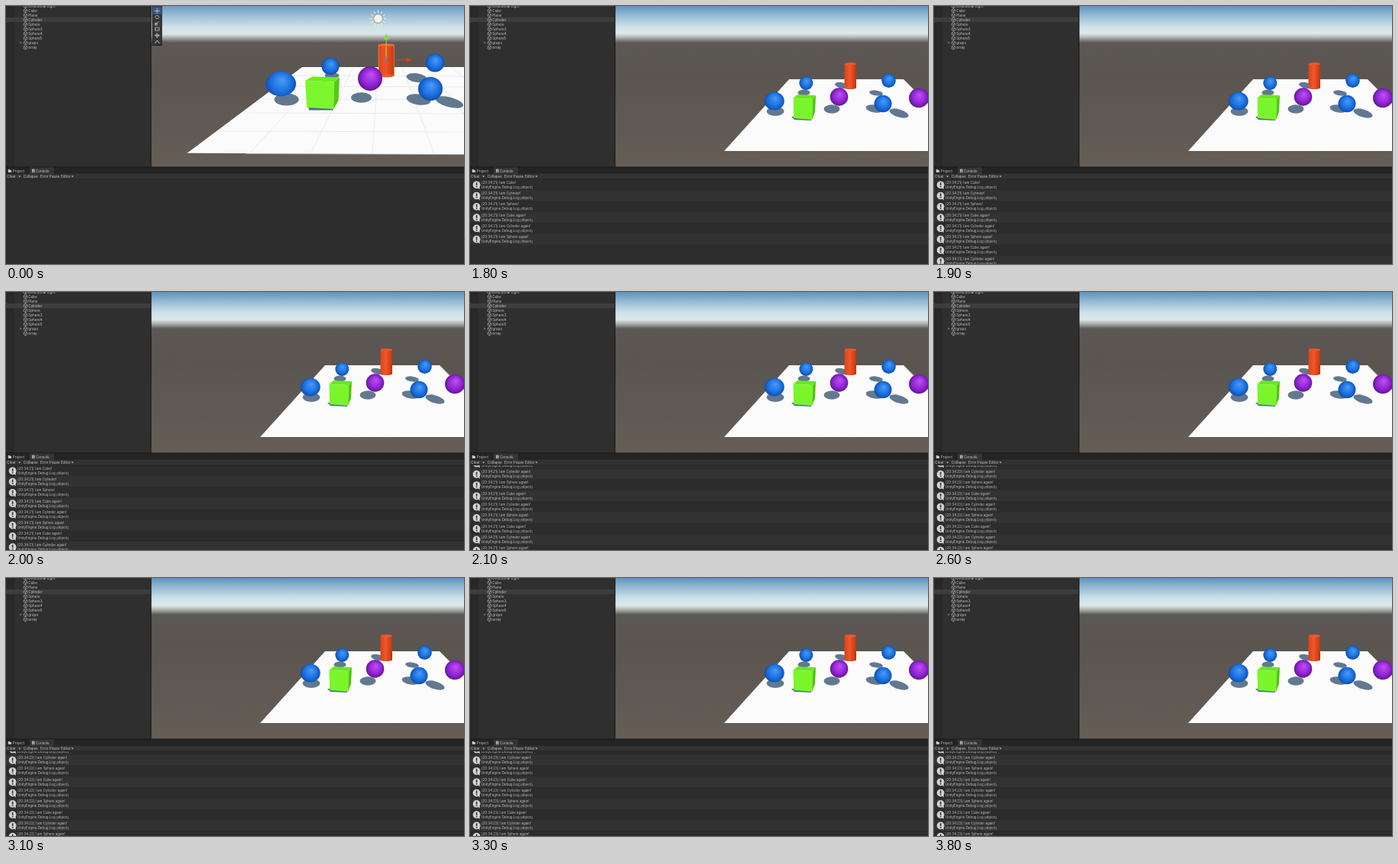
An HTML page with a canvas that plays this animation: 600x338 px, repeating every 4.1 s.

```html
<!DOCTYPE html>
<html lang="en">
<head>
<meta charset="utf-8">
<title>Editor console</title>
<style>
  html, body { margin: 0; width: 100%; height: 100%; overflow: hidden; background: #2d2d2d; }
  canvas { display: block; width: 600px; height: 338px; }
</style>
</head>
<body>
<canvas id="stage" width="600" height="338"></canvas>
<script>
const ctx = document.getElementById('stage').getContext('2d');
const LOOP = 4100, PLAY = 1800, FILL = 1900, SCROLL = 2100;
const FONT = 'Inter, Roboto, sans-serif';
const SHADOW = '#62788f';
const BLUE = ['#4b9cf4', '#1c71e2', '#0c49a0'];
const PURPLE = ['#c052f5', '#9526d6', '#5b1290'];
const KINDS = ['Cube', 'Cylinder', 'Sphere'];

function rect(x, y, w, h, color) {
  ctx.fillStyle = color;
  ctx.fillRect(x, y, w, h);
}

function poly(color, ...p) {
  ctx.beginPath();
  for (let i = 0; i < p.length; i += 2) ctx.lineTo(p[i], p[i + 1]);
  ctx.closePath();
  ctx.fillStyle = color;
  ctx.fill();
}

function line(color, width, ...p) {
  ctx.beginPath();
  for (let i = 0; i < p.length; i += 2) ctx.lineTo(p[i], p[i + 1]);
  ctx.strokeStyle = color;
  ctx.lineWidth = width;
  ctx.stroke();
}

function oval(x, y, rx, ry, color, turn = 0) {
  ctx.beginPath();
  ctx.ellipse(x, y, rx, ry, turn, 0, 7);
  ctx.fillStyle = color;
  ctx.fill();
}

function ring(x, y, r, color, width = 0.7) {
  ctx.beginPath();
  ctx.arc(x, y, r, 0, 7);
  ctx.strokeStyle = color;
  ctx.lineWidth = width;
  ctx.stroke();
}

// y is the middle of the lower-case letters
function label(text, x, y, color = '#c2c2c2', size = 4.6) {
  ctx.font = `${size}px ${FONT}`;
  ctx.fillStyle = color;
  ctx.fillText(text, x, y + 1.6);
}

function ball(x, y, rx, ry, [light, mid, dark]) {
  const g = ctx.createRadialGradient(x + rx * 0.1, y - ry * 0.35, 0, x, y, rx * 1.08);
  g.addColorStop(0, light);
  g.addColorStop(0.6, mid);
  g.addColorStop(1, dark);
  oval(x, y, rx, ry, g);
}

function sky(stops) {
  const g = ctx.createLinearGradient(0, 0, 0, 211);
  for (const [y, color] of stops) g.addColorStop(y / 211, color);
  rect(190, 0, 410, 211, g);
}

function cylinder(x, top, w, bottom, cap) {
  const g = ctx.createLinearGradient(x, 0, x + w, 0);
  g.addColorStop(0, '#d8431a');
  g.addColorStop(0.45, '#f4562a');
  g.addColorStop(1, '#b93812');
  const mid = x + w / 2;
  rect(x, top + cap, w, bottom - top - cap * 2, g);
  oval(mid, bottom - cap, w / 2, cap, g);
  oval(mid, top + cap, w / 2, cap, '#e9582f');
}

function toolStrip() {
  rect(191.5, 0, 13, 52, '#202020');
  rect(192.5, 0, 11, 51, '#383838');
  rect(192.5, 1.5, 11, 9.5, '#3b5c86');
  const c = '#c8c8c8';
  line(c, 0.8, 198, 3, 198, 10);
  line(c, 0.8, 194.5, 6.5, 201.5, 6.5);
  ring(198, 14.5, 2.3, c);
  line(c, 0.8, 196, 24.5, 200.5, 20);
  ctx.strokeRect(195.5, 22.5, 2.5, 2.5);
  ctx.strokeRect(195.5, 28, 5, 4);
  ring(198, 38.5, 2, c);
  line(c, 0.7, 198, 35, 198, 42);
  line(c, 0.7, 194.5, 38.5, 201.5, 38.5);
  line(c, 0.9, 195, 49, 198, 45, 201, 49);
  for (let y = 10.8; y < 50; y += 8) rect(192.5, y, 11, 0.5, '#282828');
}

function lightIcon(x, y) {
  for (let i = 0; i < 12; i++) {
    const a = i * Math.PI / 6, c = Math.cos(a), s = Math.sin(a);
    line('#f3f0dc', 1, x + c * 7.5, y + s * 7.5, x + c * 11, y + s * 11);
  }
  oval(x, y, 5.8, 5.8, '#f5f3e4');
  ring(x, y, 5.8, '#8b8f8c', 0.8);
}

function moveGizmo(x, y) {
  line('#8ee63a', 1, x, y, x, 44);
  poly('#7fe52f', x - 3.2, 44, x, 36, x + 3.2, 44);
  line('#e5391c', 1, x, y, 524, y);
  poly('#dd3a1d', 524, y - 3, 532.5, y, 524, y + 3);
  ctx.globalAlpha = 0.65;
  rect(x - 3, y - 4, 4, 5, '#6d76d8');
  ctx.globalAlpha = 1;
}

function editView() {
  sky([[0, '#6c9bc2'], [14, '#a2c2d8'], [28, '#d0e2e8'], [37, '#dbe5e6'], [42, '#a3a6a4'],
       [48, '#5d5956'], [90, '#5c5550'], [211, '#655d56']]);
  poly('#fbfbfb', 388, 80, 640, 80, 800, 195.5, 237, 193);
  for (let i = 1; i < 8; i++) line('#e2e2e2', 0.7, 391 + i * 32, 80, 237 + i * 81, 194);
  for (const y of [91, 105, 122, 140, 164]) {
    line('#e4e4e4', 0.7, 388 - (y - 80) * 1.336, y, 600, y + 1);
  }
  line('#5a5754', 0.9, 238, 193.2, 314, 193.6);
  line('#a9a7a4', 0.7, 314, 193.6, 600, 194.6);

  oval(367.5, 122.5, 16, 8, SHADOW);
  oval(427, 91, 9.5, 4, SHADOW);
  oval(465.5, 120, 13.5, 6.8, SHADOW);
  oval(538, 94, 13.5, 5.8, SHADOW, 0.15);
  oval(540.5, 122.5, 16, 7, SHADOW, 0.15);
  oval(581, 126, 18.5, 6.5, SHADOW, 0.25);
  oval(484, 88, 11, 4.5, SHADOW, 0.2);

  ball(360, 102, 20, 16.2, BLUE);
  ball(425, 79, 11.5, 11.2, BLUE);
  ball(562, 74.5, 12.3, 12, BLUE);
  ball(556, 108.5, 16, 15.5, BLUE);

  poly('#4c6f8f', 396, 132, 430, 133, 428, 136.5, 397, 136.5);
  poly('#6cee20', 392, 98, 401, 92.5, 437, 93.5, 430, 99.5);
  poly('#7cf62c', 392, 98, 430, 99.5, 429, 135, 394, 133);
  poly('#55c916', 430, 99.5, 437, 93.5, 435.5, 124, 429, 135);

  cylinder(488, 49, 20.5, 93.5, 2.5);
  ctx.strokeStyle = '#ff8a24';
  ctx.lineWidth = 0.8;
  ctx.strokeRect(488.2, 51, 20, 40);
  for (let x = 492; x < 508; x += 4) line('#d9531c', 0.5, x, 52, x, 92);
  moveGizmo(498, 70.5);
  ball(477, 95, 16, 16, PURPLE);
  lightIcon(487.5, 16.5);
  toolStrip();
}

function playView() {
  sky([[0, '#5f92bf'], [12, '#93b9d4'], [26, '#cadfe8'], [36, '#dfe9ea'], [42, '#a8aba9'],
       [48, '#5c5855'], [90, '#5b5550'], [211, '#655d56']]);
  poly('#fbfbfb', 418, 96, 568, 96, 662, 190, 333, 190);

  oval(400, 138, 11.5, 6, SHADOW);
  oval(437.5, 113.5, 8, 4, SHADOW);
  oval(474, 135, 10.5, 5.8, SHADOW);
  oval(532, 114, 9, 3.4, SHADOW, 0.15);
  oval(530, 134.5, 11.5, 5, SHADOW, 0.15);
  oval(562, 140.5, 13, 5, SHADOW, 0.3);
  oval(487, 104, 9, 3.8, SHADOW, 0.2);

  ball(398.7, 124.5, 13, 12, BLUE);
  ball(440.3, 101, 9, 9, BLUE);
  ball(548.5, 97.7, 9.3, 9.3, BLUE);
  ball(541, 128, 11.5, 11.3, BLUE);

  poly('#4c6f8f', 421, 145, 448, 145, 447, 150, 425, 149);
  poly('#69e81f', 423.5, 121, 429, 116, 453, 117, 449, 122);
  poly('#7af52b', 423.5, 121, 449, 122, 448, 149, 424, 147);
  poly('#53c515', 449, 122, 453, 117, 452, 139, 448, 149);

  cylinder(490.5, 74, 15.5, 109, 1.8);
  ball(483.5, 119, 11.8, 11.8, PURPLE);
  ball(588, 120.5, 13, 12.8, PURPLE);
}

function cubeIcon(x, y) {
  line('#b5b5b5', 0.6, x, y - 2.6, x + 2.3, y - 1.3, x + 2.3, y + 1.3, x, y + 2.6,
       x - 2.3, y + 1.3, x - 2.3, y - 1.3, x, y - 2.6);
  line('#b5b5b5', 0.6, x - 2.3, y - 1.3, x, y, x + 2.3, y - 1.3);
  line('#b5b5b5', 0.6, x, y, x, y + 2.6);
}

function hierarchy() {
  rect(0, 0, 190, 211, '#2f2f2f');
  rect(0, 0, 11.5, 211, '#292929');
  rect(0, 15, 190, 6.2, '#3d3d3d');
  const items = ['Directional Light', 'Cube', 'Plane', 'Cylinder', 'Sphere', 'Sphere3',
                 'Sphere4', 'Sphere5', 'grupo', 'array'];
  items.forEach((name, i) => {
    const y = i * 6.02;
    cubeIcon(25.5, y + 0.2);
    label(name, 29.3, y);
  });
  poly('#8a8a8a', 18.5, 46.5, 20.5, 48, 18.5, 49.5);
  rect(189.3, 0, 1.2, 211, '#191919');
}

function consoleBars() {
  rect(0, 210.5, 600, 1.2, '#191919');
  rect(0, 211.5, 600, 8.5, '#242424');
  rect(31, 211.5, 32, 8.5, '#353535');
  rect(0, 219.8, 600, 7.2, '#333333');
  rect(0, 226.6, 600, 0.6, '#202020');
  rect(2.8, 214.8, 4.2, 3.2, '#c4c4c4');
  rect(2.8, 214, 2, 1, '#c4c4c4');
  rect(34, 213.7, 3.6, 4.5, '#bdbdbd');
  for (let y = 214.7; y < 218; y += 1.2) rect(34.6, y, 2.4, 0.5, '#4a4a4a');
  label('Project', 8.8, 216);
  label('Console', 39, 216);
  label('Clear', 1.3, 223.4);
  label('Collapse', 22.8, 223.4);
  label('Error Pause', 45, 223.4);
  label('Editor', 72, 223.4);
  for (const x of [17.8, 87]) poly('#b8b8b8', x - 1.5, 222.5, x + 1.5, 222.5, x, 224.5);
  for (const x of [21, 43.5, 70.5]) rect(x, 220, 0.5, 7, '#272727');
}

function logRow(i, top, second, again) {
  rect(0, top, 600, 14.3, i % 2 ? '#323232' : '#2c2c2c');
  poly('#cfcfcf', 8, 237 + top - 227, 13, 240 + top - 227, 12, 234 + top - 227);
  oval(8.6, top + 7.3, 4.9, 4.9, '#d2d2d2');
  rect(7.9, top + 4.2, 1.5, 3.9, '#292929');
  rect(7.9, top + 9, 1.5, 1.5, '#292929');
  label(`[20:34:${second}] I am ${KINDS[i % 3]}${again ? ' again' : ''}!`, 15, top + 4.1, '#bdbdbd', 4.45);
  label('UnityEngine.Debug:Log (object)', 15, top + 10.1, '#bdbdbd', 4.45);
}

function consoleLog(t) {
  rect(0, 227, 600, 111, '#2d2d2d');
  if (t < PLAY) return;
  const scrolled = t >= SCROLL;
  const count = t < FILL ? 6 : 9;
  const second = t < 2200 ? 21 : t < 3200 ? 22 : 23;
  const first = scrolled ? 217.2 : 227;
  ctx.save();
  ctx.beginPath();
  ctx.rect(0, 227, 600, 111);
  ctx.clip();
  for (let i = 0; i < count; i++) logRow(i, first + i * 14.27, second, scrolled || i > 2);
  ctx.restore();
}

function draw(t) {
  ctx.save();
  ctx.beginPath();
  ctx.rect(190, 0, 410, 211);
  ctx.clip();
  if (t < PLAY) editView(); else playView();
  ctx.restore();
  hierarchy();
  consoleLog(t);
  consoleBars();
}

const start = performance.now();
function tick() {
  draw((performance.now() - start) % LOOP);
  requestAnimationFrame(tick);
}
tick();
</script>
</body>
</html>
```
